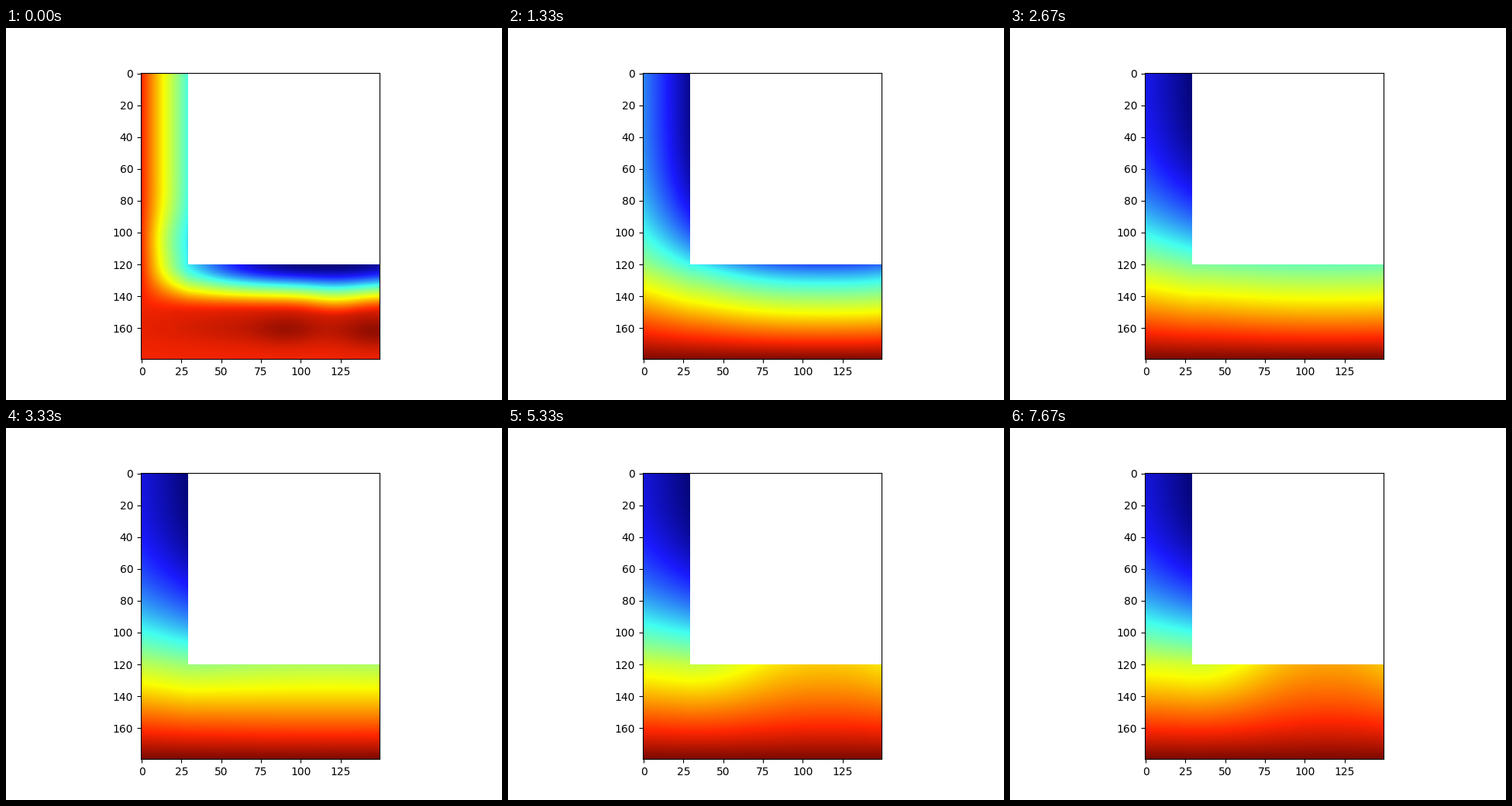
Recreate the animation shown at these times as a matplotlib script. Size 640x480 px, loop 8000 ms.

```python
import numpy as np
import matplotlib.pyplot as plt
from matplotlib.animation import FuncAnimation
from matplotlib.colors import LinearSegmentedColormap

LOOP_MS, FRAME_MS = 8000, 50
FRAMES = LOOP_MS // FRAME_MS
STEPS = 24                      # the picture changes this often per loop
ROWS, COLS = 180, 150
CORNER_X, CORNER_Y = 29, 120    # inner corner of the L shape

x, y = np.arange(COLS), np.arange(ROWS)
X, Y = np.meshgrid(x, y)
hole = (Y < CORNER_Y) & (X > CORNER_X)


def mix(a, b, share):
    return a + (b - a) * share


def smooth(u):
    u = np.clip(u, 0, 1)
    return u * u * (3 - 2 * u)


def blob(cx, cy, sx, sy):
    return np.exp(-((X - cx) / sx) ** 2 / 2 - ((Y - cy) / sy) ** 2 / 2)


across = np.clip(X / CORNER_X, 0, 1)                    # through the arm
depth = np.clip((Y - CORNER_Y) / (ROWS - 1 - CORNER_Y), 0, 1)
height = np.clip(Y / CORNER_Y, 0, 1)                    # down the arm
bay = np.clip(1 - np.abs((X - 115) / (115 - CORNER_X)) ** 2.4, 0, 1)
bay = np.where(X > CORNER_X, bay, 0)

# Uneven start: a thin cold layer above a hot, patchy bulk
layer = smooth((Y - CORNER_Y) / (31 + 3 * np.exp(-((x - 122) / 18) ** 2)))
patches = (.045 * blob(75, 160, 45, 8) + .04 * blob(92, 161, 14, 7)
           + .08 * blob(149, 162, 18, 8) - .07 * blob(18, 105, 10, 12))


def heat(t):
    """Temperature from 0 to 1 after t seconds."""
    rise = 1 - np.exp(-(t / 2.95) ** 1.7)
    start = np.exp(-t / .25)

    # Level along the line of the inner corner
    left = .40 + .20 * rise + .48 * np.exp(-t / .6)
    corner = .29 + .29 * rise + .07 * start
    bay_now = bay ** (1 + 1.5 * rise)
    surface = mix(mix(left, corner, across), .745 * rise, bay_now)

    # Foot: down to the hot base
    base = 1 - .11 * np.exp(-t / .4)
    bow = .25 * (1 - rise) - .3 * bay_now * rise ** 2
    settled = mix(surface, base, depth + bow * depth * (1 - depth))
    foot = mix(settled, mix(surface, .89, layer), start)

    # Arm: up to the cooling top
    top_left = .09 + .79 * np.exp(-(t / .85) ** 1.2)
    top_right = .38 * np.exp(-t / .43)
    top = mix(top_left, top_right, across)
    arm = mix(top, surface, height ** (2.5 + 5 * np.exp(-t)))

    field = np.where(Y < CORNER_Y, arm, foot) + patches * start
    return np.ma.array(np.clip(field, 0, 1), mask=hole)


def rgb(r, g, b):
    return r / 255, g / 255, b / 255


heat_map = LinearSegmentedColormap.from_list("heat", [
    (0, rgb(6, 6, 122)), (.12, rgb(26, 26, 255)), (.36, rgb(66, 255, 240)),
    (.64, rgb(250, 255, 0)), (.88, rgb(255, 38, 0)), (1, rgb(128, 10, 0))], N=512)

fig, ax = plt.subplots(figsize=(6.4, 4.8), dpi=100)
image = ax.imshow(heat(0), cmap=heat_map, vmin=0, vmax=1)
ax.set_xticks(range(0, 126, 25))
ax.set_yticks(range(0, 161, 20))


def update(i):
    step = min((i + 1) * STEPS // FRAMES, STEPS - 1)
    image.set_data(heat(step * LOOP_MS / STEPS / 1000))
    return [image]


anim = FuncAnimation(fig, update, frames=FRAMES, interval=FRAME_MS,
                     repeat=True, repeat_delay=0)
plt.show()
```
